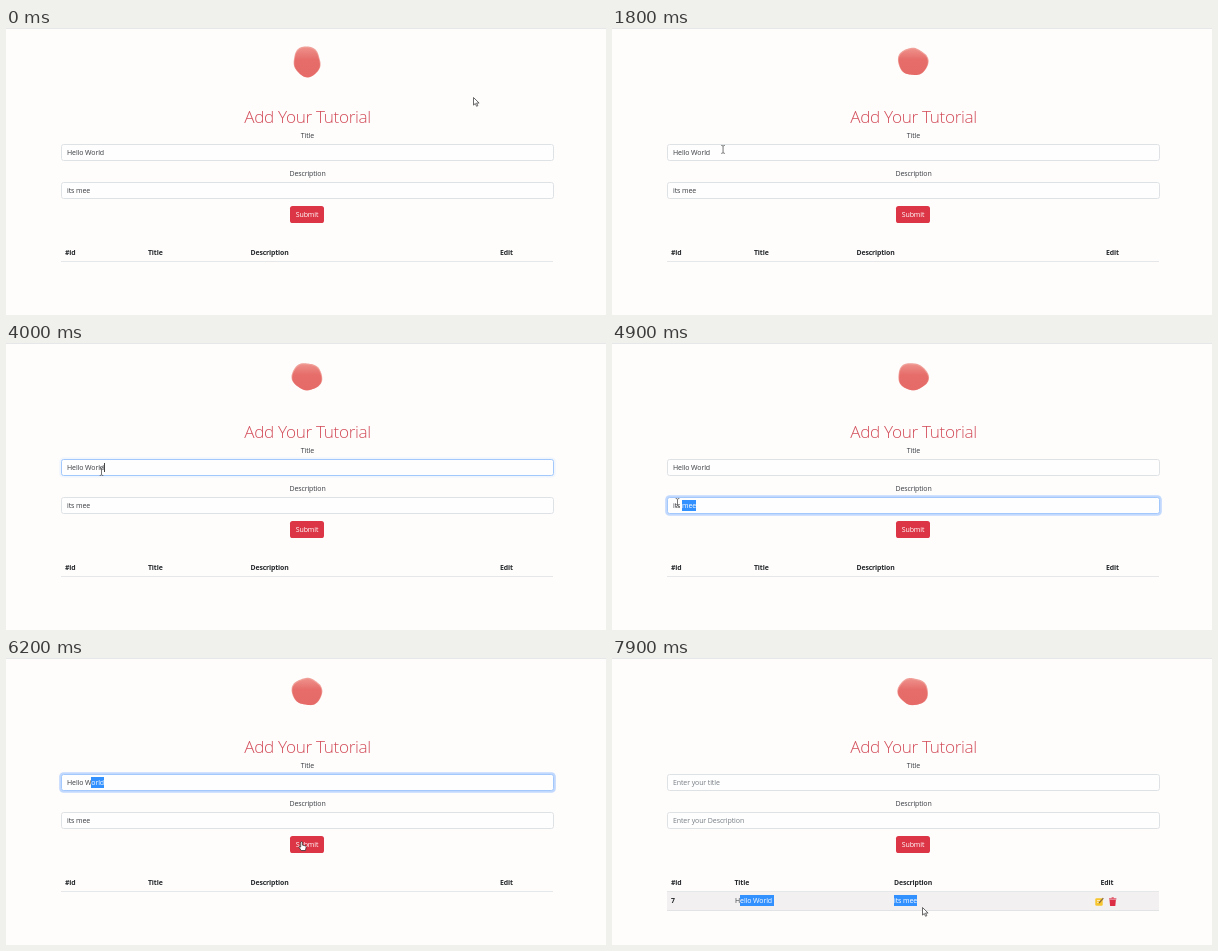
An HTML page for the animation above (8 s loop, 600 px wide and 287 px high).

```html
<!DOCTYPE html>
<html lang="en">
<head>
<meta charset="utf-8">
<title>Add Your Tutorial</title>
<style>
html, body { margin: 0; width: 100%; height: 100%; overflow: hidden; }
body { background: #fefdfc; font: 7px/10px "Open Sans", "Noto Sans", sans-serif; letter-spacing: -.015em; color: #383c40; cursor: default; }
body *, svg { position: absolute; box-sizing: border-box; white-space: pre; }
svg { left: 0; top: 0; overflow: visible; }
.mid { left: 301.5px; transform: translateX(-50%); }
.line { left: 55px; width: 492px; height: 1px; background: #e6e7e8; }
h1 { margin: 0; top: 77.6px; font-size: 17.2px; line-height: 21px; font-weight: 300; letter-spacing: -.02em; color: #d24c59; }
.input { left: 55px; width: 492.5px; height: 17px; border: 1px solid #dfe2e5; border-radius: 2.6px; background: #fefefe; }
#submit { left: 284px; top: 178px; width: 34px; height: 17px; border-radius: 2.6px; background: #dc3545; color: #fff; text-align: center; line-height: 18px; }
b { font-size: 6.9px; letter-spacing: -.02em; color: #26292c; }
.head { top: 220px; }
mark, i { position: static; }
mark { background: #3390ff; color: #fff; padding: .6px 0; }
i { border-left: .7px solid #444; margin-right: -.7px; }
#row { left: 55px; top: 234px; width: 492px; height: 18.5px; background: #f2f0f1; border-bottom: 1px solid #e2e3e5; }
#row > :not(svg) { top: 4px; }
</style>
</head>
<body>
<div class="line" style="left:0;top:0;width:600px"></div>
<h1 class="mid">Add Your Tutorial</h1>
<div class="mid" style="top:103px">Title</div>
<div class="input" id="box1" style="top:116px"></div>
<div id="text1" style="left:61px;top:120px"></div>
<div class="mid" style="top:141px">Description</div>
<div class="input" id="box2" style="top:154px"></div>
<div id="text2" style="left:61px;top:158px"></div>
<div id="submit">Submit</div>
<b class="head" style="left:59px">#id</b>
<b class="head" id="headTitle">Title</b>
<b class="head" id="headDesc">Description</b>
<b class="head" id="headEdit">Edit</b>
<div class="line" style="top:233px"></div>
<div id="row">
  <b style="left:4px">7</b>
  <div id="cell1" style="left:68px"></div>
  <div id="cell2" style="left:227px"></div>
  <svg width="492" height="18">
    <rect x="428.3" y="6.3" width="7.4" height="7.4" rx="1.2" fill="#f7c52d"/>
    <path d="M430 8.6h3M430 10.4h2" stroke="#fff" stroke-width=".7"/>
    <path d="M432 11.2l4.3-5" stroke="#8a6a3c" stroke-width="1.3"/>
    <path d="M442.5 7.8h6.4l-.6 6.2h-5.2z" fill="#dc2f45"/>
    <path d="M442 6.9h7.4M444.6 5.9h2.2" stroke="#dc2f45"/>
  </svg>
</div>
<svg width="600" height="287">
  <defs>
    <linearGradient id="red" x2="0" y2="1">
      <stop stop-color="#ee8f89"/><stop offset=".4" stop-color="#e66d6a"/><stop offset="1" stop-color="#e56a68"/>
    </linearGradient>
  </defs>
  <path id="back" fill="#f0a099"/>
  <path id="front" fill="url(#red)"/>
  <g id="pointer" stroke-linejoin="round">
    <path id="arrow" d="M0 0v7.6l1.8-1.6 1.3 2.8 1.2-.6-1.2-2.7h2.5z" fill="#fff" stroke="#444" stroke-width=".8"/>
    <path id="beam" d="M-1.8-4q1.8 0 1.8 1 0-1 1.8-1M0-3v6M-1.8 4q1.8 0 1.8-1 0 1 1.8 1" fill="none" stroke="#666" stroke-width=".9"/>
    <path id="hand" d="M-.8.6q.9-1.2 1.7 0v3l3 .8q.9.4.7 1.6l-.7 3h-4.2l-2.3-3.4q0-1.2 1.8 0z" fill="#fff" stroke="#222" stroke-width=".7"/>
  </g>
</svg>
<script>
const $ = id => document.getElementById(id);
const clamp = v => Math.max(0, Math.min(1, v));
const ease = f => f * f * (3 - 2 * f);
const TITLE = 'Hello World', DESC = 'its mee';

// Where the pointer rests or turns: time, x, y
const stops = [
  [0, 467, 69], [1080, 240, 88], [1480, 388, 100], [1850, 96, 122], [2150, 190, 215],
  [2500, 325, 23], [2800, 408, 68], [4000, 95, 128], [4650, 84, 161], [4900, 65, 159],
  [5500, 99, 126], [5700, 84, 125], [6200, 295, 183], [6600, 295, 183], [7250, 127, 243],
  [7850, 310, 249]
];

function pointerAt(t) {
  const n = stops.findIndex(s => s[0] > t);
  if (n < 0) return stops.at(-1).slice(1);
  const [t0, x0, y0] = stops[n - 1], [t1, x1, y1] = stops[n];
  const f = ease((t - t0) / (t1 - t0));
  return [x0 + (x1 - x0) * f, y0 + (y1 - y0) * f];
}

// Radius as a sum of slow waves: upright at first, then settling wide
function blob(t, scale, cy) {
  const wide = .9 - 2 * Math.exp(-t / 500);
  const three = .5 * Math.sin(2 * Math.PI * t / 4000);
  const points = [];
  for (let a = 0; a < 2 * Math.PI; a += Math.PI / 36) {
    const r = scale * (14.4 + wide * Math.cos(2 * a) + .4 * Math.sin(2 * a) +
      three * Math.cos(3 * a) + .35 * Math.sin(5 * a + t / 700));
    points.push([301 + r * Math.cos(a), cy + r * Math.sin(a)]);
  }
  return 'M' + points.join('L') + 'Z';
}

const select = (s, from, to) => to > from
  ? s.slice(0, from) + '<mark>' + s.slice(from, to) + '</mark>' + s.slice(to) : s;
const step = (t, t0, t1, a, b) => Math.round(a + (b - a) * clamp((t - t0) / (t1 - t0)));

function focus(box, k) {
  box.style.borderColor = k ? '#a3c8fc' : '';
  box.style.boxShadow = `0 0 0 1.8px rgba(13,110,253,${.25 * k})`;
}

function cursorKind(x, y, saved) {
  const inside = (l, t, r, b) => x >= l && x <= r && y >= t && y <= b;
  if (inside(284, 178, 318, 195)) return 'hand';
  const text = inside(55, 116, 547, 133) || inside(55, 154, 547, 171) || inside(238, 79, 365, 100) ||
    saved && (inside(122, 238, 161, 249) || inside(282, 238, 304, 249));
  return text ? 'beam' : 'arrow';
}

function draw(t) {
  const saved = t >= 6700;
  const within = (a, b) => t >= a && t < b;
  const fade = (a, b) => within(a, b) ? clamp((t - a) / 150) : 0;

  $('back').setAttribute('d', blob(t, 1, 33.6));
  $('front').setAttribute('d', blob(t, .95, 34.2));

  focus($('box1'), fade(3970, 4600) + fade(5500, 6500));
  focus($('box2'), fade(4600, 5500));
  $('submit').style.boxShadow = within(6500, 7200) ? '0 0 0 1.8px rgba(225,83,97,.5)' : '';
  $('submit').style.background = within(6300, 6700) ? '#bb2d3b' : '';

  const from1 = within(5500, 6500) ? step(t, 5500, 5700, 11, 7) : 11;
  const from2 = within(4600, 5500) ? step(t, 4650, 4850, 7, 4) : 7;
  $('text1').innerHTML = saved ? 'Enter your title'
    : select(TITLE, from1, 11) + (within(3970, 4500) ? '<i></i>' : '');
  $('text2').innerHTML = saved ? 'Enter your Description' : select(DESC, from2, 7);
  $('text1').style.color = $('text2').style.color = saved ? '#777d83' : '';

  $('row').style.display = saved ? '' : 'none';
  $('headTitle').style.left = (saved ? 122.5 : 142) + 'px';
  $('headDesc').style.left = (saved ? 282 : 244.5) + 'px';
  $('headEdit').style.left = (saved ? 488.5 : 494) + 'px';
  $('cell1').innerHTML = select(TITLE + ' ', 1, step(t, 7300, 7500, 1, 12));
  $('cell2').innerHTML = select(DESC, 0, step(t, 7600, 7750, 0, 7));

  const [x, y] = pointerAt(t), kind = cursorKind(x, y, saved);
  $('pointer').setAttribute('transform', `translate(${x + .5} ${y + .5})`);
  for (const id of ['arrow', 'beam', 'hand']) $(id).style.display = id === kind ? '' : 'none';
}

function tick() {
  draw(Math.floor(performance.now() % 8000 / 100) * 100);
  requestAnimationFrame(tick);
}
tick();
</script>
</body>
</html>
```
